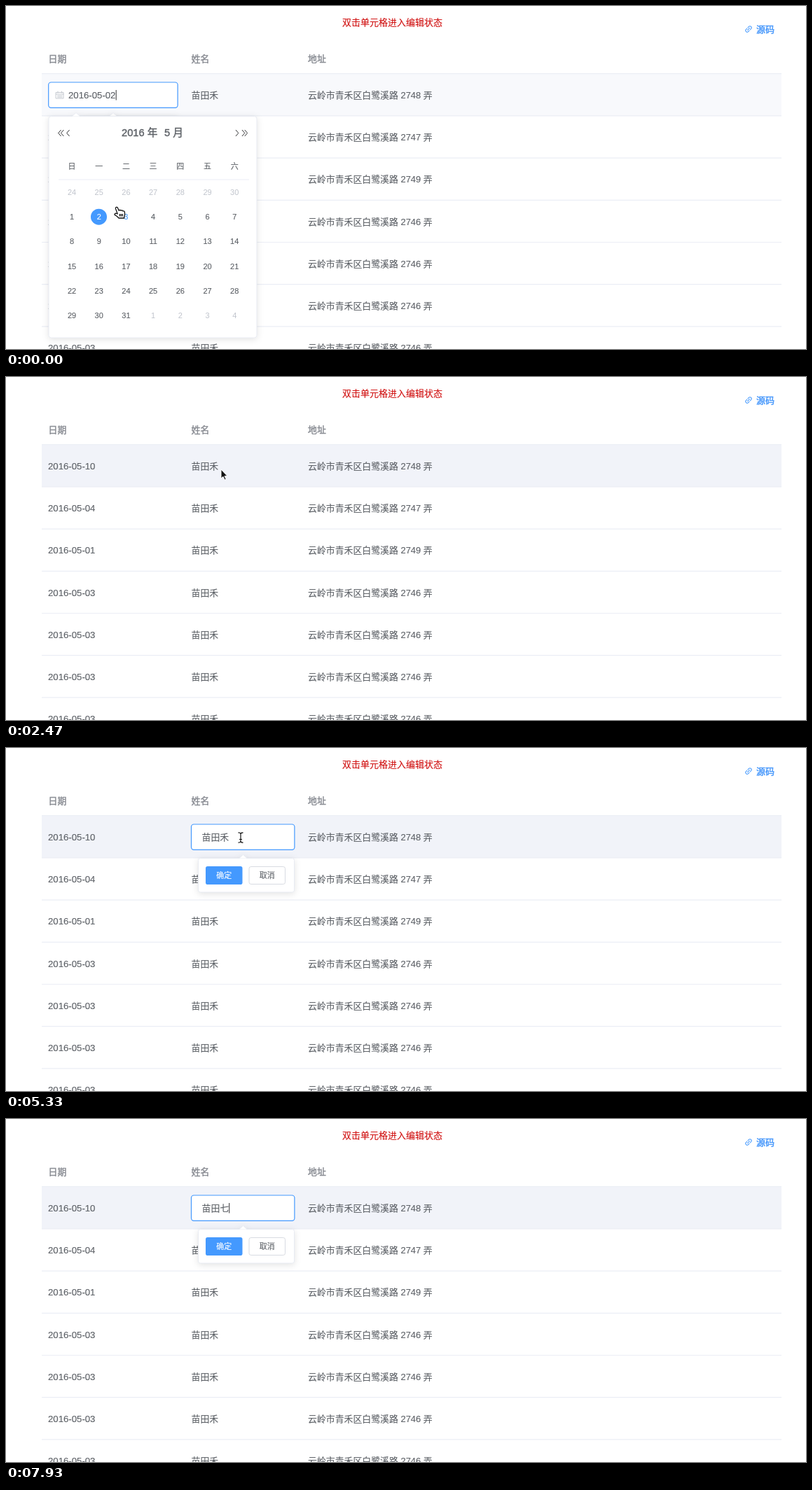
Recreate the animation shown at these times as an HTML page. Size 1142x490 px, loop 8000 ms.

```html
<!DOCTYPE html>
<html lang="zh-CN">
<head>
<meta charset="utf-8">
<title>可编辑表格</title>
<style>
html, body { margin: 0; width: 100%; height: 100%; overflow: hidden; background: #fff; }
svg { display: block; font: 12.9px "Liberation Sans", "Noto Sans CJK SC", "Noto Sans CJK", sans-serif; }
text { fill: #5c6066; stroke: #5c6066; stroke-width: .12px; white-space: pre; }
.date { font-size: 13.2px; }
.head { fill: #888b92; stroke: #888b92; stroke-width: .45px; }
.hint { fill: #d01010; stroke: #d01010; font-size: 13px; }
.link { fill: #4496fb; stroke: #4496fb; stroke-width: .45px; font-size: 13px; }
.small { font-size: 11px; text-anchor: middle; }
.title { font-size: 14.7px; stroke-width: .4px; }
.muted { fill: #c0c4cc; stroke: none; }
.white { fill: #fff; stroke: #fff; }
.line { stroke: #ebeef5; stroke-width: 1.2px; }
.panel { fill: #fff; stroke: #e8ebf2; }
.shadow { filter: drop-shadow(0 2px 5px rgba(0, 0, 0, .11)); }
.icon { fill: none; stroke-linecap: round; }
</style>
</head>
<body>
<svg id="stage" width="1142" height="490" viewBox="0 0 1142 490"></svg>
<script>
const LOOP = 8000, TOP = 96.7, ROW = 60.2, BLUE = '#4499fe';
const PICK = 1070, SAVE = 1950, EDIT = 3110, FOCUS = 3700, ERASE = 5700, COMMIT = 7500;
const NAME = '苗田禾';
const dates = ['10', '04', '01', '03', '03', '03', '03'];
const numbers = [2748, 2747, 2749, 2746, 2746, 2746, 2746];

// time, x, y of the pointer
const path = [
  [0, 159, 288], [250, 159, 288], [750, 174, 341], [1300, 174, 341], [1650, 146, 184],
  [2000, 146, 184], [2280, 307, 132], [2700, 307, 132], [2950, 296, 128],
  [3700, 296, 128], [4100, 335, 128]
];

const text = (x, y, str, cls = '', attrs = '') =>
  `<text x="${x}" y="${y + (cls.startsWith('small') ? 4 : 4.7)}" class="${cls}" ${attrs}>${str}</text>`;
const rect = (x, y, w, h, r, attrs) =>
  `<rect x="${x}" y="${y}" width="${w}" height="${h}" rx="${r}" ${attrs}/>`;
const line = (x1, x2, y) => `<path class="line" d="M${x1} ${y}H${x2}"/>`;
const tip = x => `<path class="panel" d="M${x - 5.5} 157.5L${x} 152.5L${x + 5.5} 157.5"/>`;
const icon = (d, color, width = 1) =>
  `<path class="icon" d="${d}" stroke="${color}" stroke-width="${width}"/>`;

function tableRow(day, i) {
  const y = TOP + ROW * i, mid = y + 30.5;
  return rect(51, y, 1056, ROW, 0, `id="bg${i}" fill="#f1f3f9"`) + line(51, 1107, y + ROW) +
    text(60, mid, '2016-05-' + day, 'date', `id="date${i}"`) +
    text(264.5, mid, NAME, '', `id="name${i}"`) +
    text(431, mid, `云岭市青禾区白鹭溪路 ${numbers[i]} 弄`);
}

function field(id, x, w, content) {
  return `<g id="${id}">` +
    rect(x, 109, w, 36.4, 3.6, `id="${id}Box" fill="#fff" stroke-width="1.2"`) + content +
    `<path id="${id}Caret" d="M0 120V134.5" stroke="#303133"/></g>`;
}

function confirmBox(id, x, arrow) {
  return `<g id="${id}"><g class="shadow">` + rect(x, 157.5, 137, 48.5, 3, 'class="panel"') + tip(arrow) + '</g>' +
    rect(x + 10.5, 169, 52.5, 26, 2.8, `fill="${BLUE}"`) +
    text(x + 36.8, 182, '确定', 'small white') +
    rect(x + 72.5, 169.5, 51.5, 25, 2.8, 'fill="#fff" stroke="#d8dbe2"') +
    text(x + 98.2, 182, '取消', 'small') + '</g>';
}

function picker() {
  const col = i => 94 + i % 7 * 38.7, chevron = ([x, s]) => `M${x + 1.8 * s} 177.3l${-3.6 * s} 4.2l${3.6 * s} 4.2`;
  let out = '<g id="picker"><g class="shadow">' + rect(61, 157.5, 297, 316.5, 3.6, 'class="panel"') + tip(100) + '</g>' +
    icon([[76.5, 1], [80.3, 1], [88.5, 1], [330, -1], [339, -1], [342.8, -1]].map(chevron).join(''), '#303133') +
    text(165, 181.5, '2016 年', 'title') + text(226, 181.5, '5 月', 'title') + line(75, 347, 248) +
    `<circle id="chosen" r="11.5" fill="${BLUE}"/>`;
  [...'日一二三四五六'].forEach((d, i) => out += text(col(i), 229, d, 'small'));
  for (let i = 0; i < 42; i++) {
    const n = i < 7 ? 24 + i : i < 38 ? i - 6 : i - 37;
    const inMonth = i > 6 && i < 38;
    out += text(col(i), 266 + Math.floor(i / 7) * 35.2, n,
      inMonth ? 'small' : 'small muted', inMonth ? `id="day${n}"` : '');
  }
  return out + '</g>';
}

const pointers = '<g id="pointer">' +
  '<path id="hand" fill="#fff" stroke="#111" stroke-width="1.3" stroke-linejoin="round" d="M-2.6 1.4C-3-.6-.4-1.4.5.4L2.2 4.2C2.8 3 4.5 3.1 5 4.3C6 3.4 7.4 3.8 7.8 5C9 4.4 10.2 5.2 10.4 6.6L10.6 10L9.4 15H2L-.8 12.2L-3.8 10.4C-4.6 9-3 7.8-1.6 8.4L.2 9Z M3.4 9v3.4M5.4 9v3.4M7.4 9v3.4"/>' +
  '<path id="arrow" fill="#111" stroke="#fff" d="M0 0V13L3 10.3L5.2 15L7.2 14.1L5 9.6H9Z"/>' +
  '<path id="beam" fill="none" stroke="#111" stroke-width="1.2" d="M-3.5-7.2Q0-7.2 0-5Q0-7.2 3.5-7.2M0-5V5M-3.5 7.2Q0 7.2 0 5Q0 7.2 3.5 7.2M-2 2.5H2"/></g>';

const stage = document.getElementById('stage');
stage.innerHTML =
  text(480, 23.5, '双击单元格进入编辑状态', 'hint') +
  `<g transform="translate(1060 33) rotate(-45)">${icon('M-.8-2.2H-2.8a2.2 2.2 0 0 0 0 4.4H-.8M.8-2.2H2.8a2.2 2.2 0 0 1 0 4.4H.8M-2 0H2', BLUE)}</g>` +
  text(1071, 33, '源码', 'link') +
  text(60.5, 75.5, '日期', 'head') + text(264.5, 75.5, '姓名', 'head') + text(431, 75.5, '地址', 'head') +
  dates.map(tableRow).join('') + line(51, 1107, TOP) +
  field('dateField', 60.7, 184.4,
    icon('M71.5 123.5H82V132H71.5ZM71.5 126H82M74 122v2M79.5 122v2M73.5 128.2h6.5M73.5 130.2h6.5', '#c0c4cc', .9) +
    text(89, 127.2, '', 'date', 'id="dateValue"')) +
  field('nameField', 264.5, 147.4, text(279.5, 127.2, '', '', 'id="nameValue"')) +
  confirmBox('dateConfirm', 108, 153) + confirmBox('nameConfirm', 274.5, 338.5) +
  picker() + pointers;

const el = {};
stage.querySelectorAll('[id]').forEach(node => el[node.id] = node);

const clamp = v => Math.min(1, Math.max(0, v));
const show = (id, alpha) => {
  el[id].style.display = alpha > 0 ? '' : 'none';
  el[id].style.opacity = +alpha;
};
const blink = (t, from) => (t - from) % 1000 < 500;

function pointerAt(t) {
  const i = path.findIndex(p => p[0] > t);
  if (i < 0) return path[path.length - 1].slice(1);
  const [t0, x0, y0] = path[Math.max(0, i - 1)], [t1, x1, y1] = path[i];
  const p = clamp((t - t0) / (t1 - t0)), e = p * p * (3 - 2 * p);
  return [x0 + (x1 - x0) * e, y0 + (y1 - y0) * e];
}

function hoveredRow(t) {
  if (t < -120) return 0;
  const [x, y] = pointerAt(t);
  const overConfirm = t < SAVE + 150 && x > 108 && x < 245 && y > 157 && y < 206;
  return t < 1300 || overConfirm ? -1 : Math.floor((y - TOP) / ROW);
}

function draw(t) {
  const editDate = t < SAVE, editName = t >= EDIT, picked = t >= PICK, focused = t >= FOCUS;
  const [x, y] = pointerAt(t);

  // highlights fade over 250 ms
  const recent = Array.from({ length: 10 }, (_, k) => hoveredRow(t - 25 * k));
  dates.forEach((_, i) => show('bg' + i, recent.filter(r => r === i).length / 10));

  show('date0', !editDate);
  show('name0', !editName);
  show('dateField', editDate);
  show('nameField', editName);
  el.dateFieldBox.setAttribute('stroke', picked ? '#dcdfe6' : BLUE);
  el.nameFieldBox.setAttribute('stroke', focused ? BLUE : '#c0c4cc');
  el.dateValue.textContent = picked ? '2016-05-10' : '2016-05-02';
  const value = t < ERASE ? NAME : NAME.slice(0, 2) + (t < COMMIT ? '' : '七');
  el.nameValue.textContent = value;
  show('dateFieldCaret', !picked && blink(t, 0));
  el.dateFieldCaret.setAttribute('transform', 'translate(157.2)');
  show('nameFieldCaret', focused && blink(t, t < ERASE ? FOCUS : t < COMMIT ? ERASE : COMMIT));
  el.nameFieldCaret.setAttribute('transform', `translate(${280 + 12.9 * value.length})`);

  show('dateConfirm', 1 - clamp((t - SAVE) / 200));
  show('nameConfirm', clamp((t - EDIT) / 200));

  const open = (1 - clamp((t - PICK) / 230)) ** 2;
  show('picker', open);
  el.picker.setAttribute('transform', `translate(0 ${157 * (1 - open)}) scale(1 ${open})`);
  const chosen = picked ? 10 : 2, over = y < 318 ? 3 : 10;
  el.chosen.setAttribute('cx', picked ? 171 : 132.5);
  el.chosen.setAttribute('cy', picked ? 336.4 : 301.2);
  for (const d of [2, 3, 10]) {
    const color = d === chosen ? '#fff' : d === over ? BLUE : '';
    Object.assign(el['day' + d].style, { fill: color, stroke: color });
  }

  const shape = t < 1320 || t > 1550 && t < 2040 ? 'hand' : t > 2800 ? 'beam' : 'arrow';
  for (const id of ['hand', 'arrow', 'beam']) show(id, id === shape);
  show('pointer', t < ERASE);
  el.pointer.setAttribute('transform', `translate(${x} ${y})`);
}

const start = performance.now();
function tick() {
  draw((performance.now() - start) % LOOP);
  requestAnimationFrame(tick);
}
tick();
</script>
</body>
</html>
```
